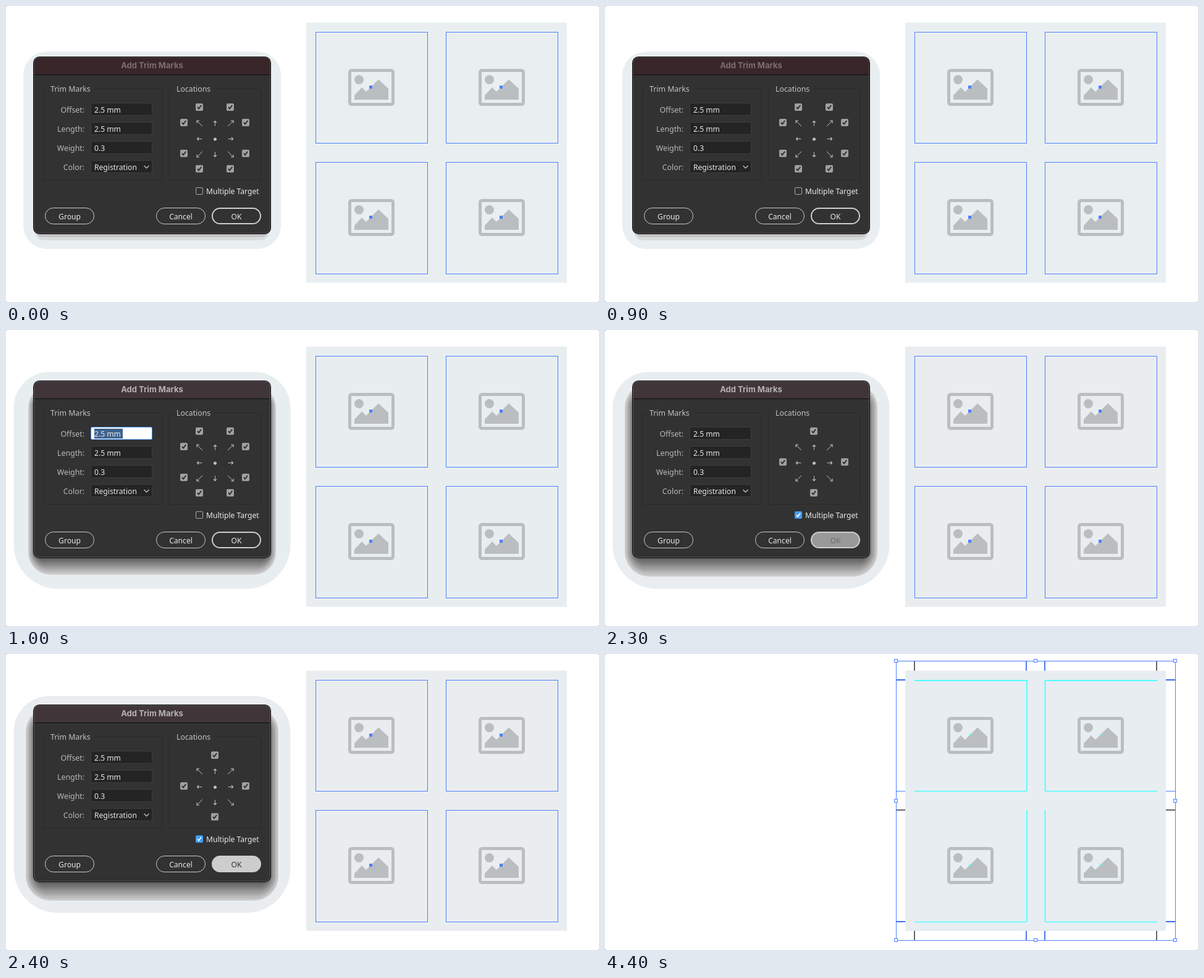
Recreate the animation shown at these times as an HTML page with a canvas. Size 960 px wide and 480 px high, loop 5.8 s.

```html
<!DOCTYPE html>
<html lang="en">
<head>
<meta charset="utf-8">
<title>Add Trim Marks</title>
<style>
html, body { margin: 0; width: 100%; height: 100%; overflow: hidden; background: #fff; }
canvas { display: block; }
</style>
</head>
<body>
<canvas id="stage" width="960" height="480"></canvas>
<script>
const ctx = document.getElementById('stage').getContext('2d');
const LOOP = 5800;
const FOCUS = 1000, MULTI = 2000, HOVER = 2200, DONE = 4400;
const BLUE = '#4f80ff', CYAN = '#4dffff', ICON = '#babec1';
const UI_FONT = '12.3px "Noto Sans", sans-serif';
const BRIGHT_FONT = '500 12.1px "Noto Sans", sans-serif';
const COLUMNS = [501, 712], ROWS = [42, 253];

function fillRect(x, y, w, h, color) {
  ctx.fillStyle = color;
  ctx.fillRect(x, y, w, h);
}

function roundRect(x, y, w, h, r, fill, stroke, lineWidth = 1) {
  ctx.beginPath();
  ctx.roundRect(x, y, w, h, r);
  if (fill) { ctx.fillStyle = fill; ctx.fill(); }
  if (stroke) { ctx.strokeStyle = stroke; ctx.lineWidth = lineWidth; ctx.stroke(); }
}

function line(color, width, ...points) {
  ctx.beginPath();
  points.forEach(([x, y]) => ctx.lineTo(x, y));
  ctx.strokeStyle = color;
  ctx.lineWidth = width;
  ctx.stroke();
}

function text(value, x, y, color, font = UI_FONT, align = 'left') {
  ctx.font = font;
  ctx.fillStyle = color;
  ctx.textAlign = align;
  ctx.fillText(value, x, y);
}

function circle(x, y, r, color) {
  ctx.beginPath();
  ctx.arc(x, y, r, 0, Math.PI * 2);
  ctx.fillStyle = color;
  ctx.fill();
}

const mix = (a, b, t) => Math.round(a + (b - a) * t);
const gray = v => `rgb(${v},${v},${v})`;

function eachCell(draw) {
  ROWS.forEach((y, row) => COLUMNS.forEach((x, col) => draw(x, y, col, row)));
}

function pictureIcon(x, y) {
  roundRect(x + 55.5, y + 62.5, 70, 55, 3, null, ICON, 5);
  circle(x + 70.5, y + 77.5, 7.5, ICON);
  ctx.beginPath();
  [[63, 103], [75, 90], [82, 97], [102, 77], [118, 92], [118, 110], [63, 110]]
    .forEach(([dx, dy]) => ctx.lineTo(x + dx, y + dy));
  ctx.fillStyle = ICON;
  ctx.fill();
}

function artboard(t) {
  const panel = t < FOCUS ? '#e9eff1' : t < MULTI ? '#e8eef0' : t < DONE ? '#eaedf0' : '#e8edf2';
  fillRect(486, 27, 422, 422, panel);
  eachCell(pictureIcon);
}

function selectedCells() {
  eachCell((x, y, col, row) => {
    ctx.strokeStyle = BLUE;
    ctx.lineWidth = 1;
    ctx.strokeRect(x + .5, y + .5, 181, row ? 181 : 180);
    fillRect(x + 87, y + 87, 5, 5, BLUE);
  });
}

function trimMarks() {
  const dark = '#555', mark = '#3c6bea';
  [[501, dark], [682, mark], [712, mark], [893, dark]].forEach(([x, color]) => {
    line(color, 1.8, [x, 12], [x, 27]);
    line(color, 1.8, [x, 449], [x, 464]);
  });
  [[42, mark, 2], [222.5, BLUE, 1], [253, dark, 1.8], [434, mark, 2]].forEach(([y, color, w]) => {
    line(color, w, [471, y], [486, y]);
    line(color, w, [908, y], [923, y]);
  });

  eachCell((x, y, col, row) => {
    const bottom = row ? 434.5 : 222.5;
    const inner = col ? 712.5 : 683;
    if (!row) line(CYAN, 1.8, [x, 43], [x + 182, 43]);
    line(CYAN, 1.6, [x, bottom], [x + 182, bottom]);
    line(CYAN, 1.8, [inner, y], [inner, bottom - 1]);
    line(CYAN, 1, [x + 88, y + 87], [x + 92, y + 91]);
    line(CYAN, 1, [x + 92, y + 87], [x + 88, y + 91]);
  });

  ctx.strokeStyle = BLUE;
  ctx.lineWidth = 1;
  ctx.strokeRect(471.5, 11.5, 452, 453);
  for (const x of [471, 697, 923]) {
    for (const y of [11, 238, 464]) {
      if (x === 697 && y === 238) continue;
      fillRect(x - 3, y - 3, 6, 6, '#fff');
      ctx.strokeRect(x - 2.5, y - 2.5, 5, 5);
    }
  }
}

function dialogShadow(t) {
  if (t < FOCUS) {
    roundRect(28, 74, 417, 320, 38, '#e9eff1');
    roundRect(47, 340, 379, 40, 14, '#d9dcdd');
    roundRect(48, 340, 377, 35, 12, '#c2c4c5');
    return;
  }
  const multi = t >= MULTI;
  roundRect(12.5, 68, 448, 352, [58, 58, 72, 72], multi ? '#eaedf0' : '#e8eef0');
  const grow = multi ? 4 : 0, bands = 13;
  for (let i = 0; i < bands; i++) {
    const k = i / (bands - 1);
    const x = mix(36 - grow, 47, k), bottom = mix(397 + grow * .75, 373, k), top = mix(90 - grow, 108, k);
    roundRect(x, top, 473 - 2 * x, bottom - top, mix(36 + grow, 14, k), gray(mix(206, 100, k)));
  }
}

function check(x, y, fill, tick) {
  roundRect(x - 6, y - 6, 12, 12, 2, fill);
  line(tick, 1.8, [x - 3, y], [x - 1, y + 2.6], [x + 3.2, y - 3]);
}

function arrow(x, y, dx, dy) {
  const color = '#c0c0c0', size = dx && dy ? 4.5 : 4;
  const tipX = x + dx * size, tipY = y + dy * size;
  line(color, 1, [x - dx * size, y - dy * size], [tipX, tipY]);
  const wings = dx && dy
    ? [[tipX - dx * 4, tipY], [tipX, tipY], [tipX, tipY - dy * 4]]
    : [[tipX - dx * 2.5 + dy * 2.5, tipY - dy * 2.5 + dx * 2.5], [tipX, tipY],
       [tipX - dx * 2.5 - dy * 2.5, tipY - dy * 2.5 - dx * 2.5]];
  line(color, 1.2, ...wings);
}

function groupBox(title, x, right, titleEnd) {
  line('#292929', 1, [x + 7, 134.5], [x + .5, 134.5], [x + .5, 282.5],
    [right - .5, 282.5], [right - .5, 134.5], [titleEnd, 134.5]);
  text(title, x + 12, 139, '#c3c3c3');
}

function field(label, value, y, selected) {
  text(label, 127, y + 15, '#b9b9b9', UI_FONT, 'right');
  roundRect(137.5, y - .5, 99, 20, 2, selected ? '#fff' : '#242424', selected ? '#3d8ef0' : '#3d3d3d');
  if (selected) fillRect(143, y + 2, 46, 16, '#3f638f');
  text(value, 143, y + 15, '#e9e9e9', BRIGHT_FONT);
}

function button(label, x, weight, hover = 0) {
  const inset = weight / 2;
  const fill = hover ? gray(mix(50, 205, hover)) : null;
  roundRect(x + inset, 327 + inset, 80 - weight, 27 - weight, 13.5 - inset, fill, '#cdcdcd', weight);
  text(label, x + 40, 346, gray(mix(232, 50, hover)), BRIGHT_FONT, 'center');
}

function locations(multi) {
  groupBox('Locations', 264, 413, 337);
  const boxes = multi
    ? [[338, 164], [288, 214], [388, 214], [338, 264]]
    : [[313, 164], [363, 164], [288, 189], [388, 189], [288, 239], [388, 239], [313, 264], [363, 264]];
  boxes.forEach(([x, y]) => check(x, y, '#a0a0a0', '#282828'));
  for (let dy = -1; dy <= 1; dy++) {
    for (let dx = -1; dx <= 1; dx++) {
      const x = 338.5 + dx * 25, y = 215.5 + dy * 25;
      if (dx || dy) arrow(x, y, dx, dy);
      else circle(x, y + .5, 2.5, '#c0c0c0');
    }
  }
}

function dialog(t) {
  const active = t >= FOCUS, multi = t >= MULTI;
  dialogShadow(t);
  roundRect(44, 82, 385, 288, 10, '#000');
  roundRect(45, 83, 383, 286, 9, '#323232');
  roundRect(45, 83, 383, 28, [9, 9, 0, 0], active ? '#40363a' : '#382629');
  fillRect(45, 111, 383, 1, '#0c0c0c');
  roundRect(45.5, 83.5, 382, 285, 8.5, null, active ? '#5e595b' : '#574b4d');
  text('Add Trim Marks', 236.5, 101, active ? '#b6b2b3' : '#7d6d70',
    '700 13px Inter, sans-serif', 'center');

  groupBox('Trim Marks', 60, 254, 144);
  field('Offset:', '2.5 mm', 158, active && !multi);
  field('Length:', '2.5 mm', 189);
  field('Weight:', '0.3', 220);
  field('Color:', 'Registration', 251);
  line('#d0d0d0', 1.2, [223.5, 259], [227.5, 263], [231.5, 259]);

  locations(multi);
  if (multi) check(313, 300, '#429df5', '#fff');
  else roundRect(307.5, 294.5, 11, 11, 1.5, null, '#a6a6a6');
  text('Multiple Target', 324, 305, '#e9e9e9', BRIGHT_FONT);

  const hover = t < HOVER ? 0 : Math.min(1, (Math.floor((t - HOVER) / 100) + 1) / 3);
  button('Group', 63, 1);
  button('Cancel', 243, 1);
  button('OK', 333, 2, hover);
}

function render(t) {
  fillRect(0, 0, 960, 480, '#fff');
  for (const x of [0, 959]) for (const y of [0, 479]) fillRect(x, y, 1, 1, '#777');
  artboard(t);
  if (t < DONE) {
    selectedCells();
    dialog(t);
  } else {
    trimMarks();
  }
}

const start = performance.now();
function tick() {
  render((performance.now() - start) % LOOP);
  requestAnimationFrame(tick);
}
tick();
</script>
</body>
</html>
```
